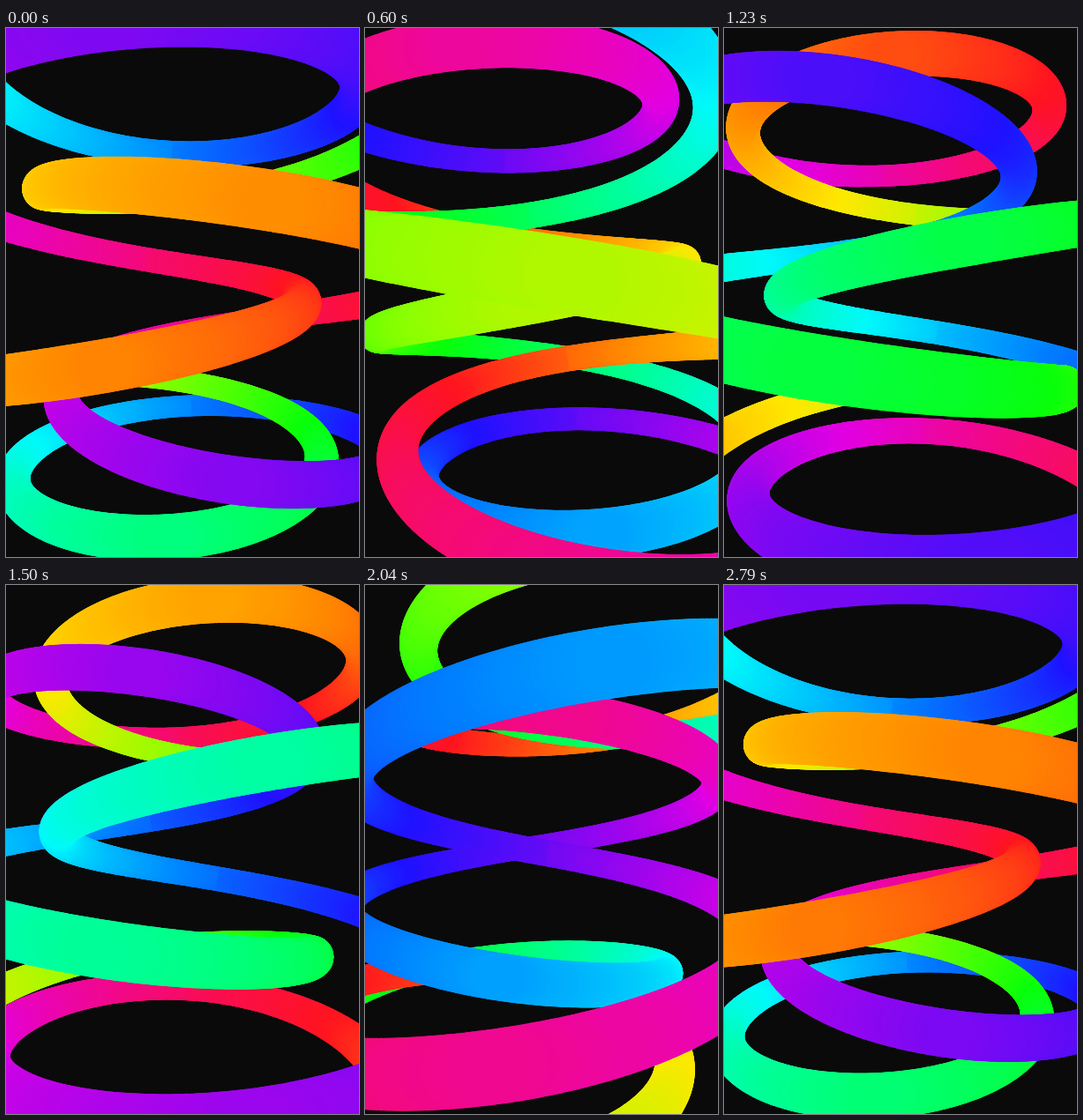
These frames come from a looping animation (400 px wide and 600 px high, 2.82 s). An HTML page with a canvas:

```html
<!DOCTYPE html>
<html>
<head>
<meta charset="utf-8">
<title>Rainbow coil</title>
<style>
html, body { margin: 0; width: 100%; height: 100%; overflow: hidden; background: #0a0a0a; }
canvas { display: block; }
</style>
</head>
<body>
<canvas id="stage" width="400" height="600"></canvas>
<script>
const ctx = document.getElementById('stage').getContext('2d');
const W = 400, H = 600, LOOP = 2820, STEP = 30, TAU = Math.PI * 2;
const CAMERA = 475;      // distance and focal length
const COIL = 200;        // radius of each turn
const SWAY = 71;         // offset of the turns from the axis
const RISE = 208;        // half height of the knot
const TUBE = 18.9;
const TURNS = 6;
const COUNT = 3000;

// one stop every 30 degrees of hue
const STOPS = [
  [255, 20, 32], [255, 138, 0], [255, 232, 0], [140, 255, 0],
  [8, 255, 10], [0, 255, 128], [0, 250, 250], [0, 130, 255],
  [30, 18, 255], [130, 8, 242], [226, 0, 226], [244, 10, 120]
];

const palette = Array.from({ length: 720 }, (_, i) => {
  const p = i / 60, k = Math.floor(p), f = p - k;
  const a = STOPS[k], b = STOPS[(k + 1) % STOPS.length];
  return `rgb(${a.map((v, c) => Math.round(v + (b[c] - v) * f)).join(',')})`;
});

const beads = Array.from({ length: COUNT }, (_, i) => ({ s: i / COUNT * TAU }));

function place(bead, turn) {
  const s = bead.s;
  const coil = TURNS * s + Math.PI + turn;
  const sway = s + Math.PI / 2 + turn;
  const x = COIL * Math.cos(coil) + SWAY * Math.cos(sway);
  const z = COIL * Math.sin(coil) + SWAY * Math.sin(sway);
  const k = CAMERA / (CAMERA - z);
  bead.k = k;
  bead.x = W / 2 + x * k;
  bead.y = H / 2 - RISE * Math.cos(s) * k;
  const hue = (2 * s + Math.PI + turn) / TAU;
  bead.color = palette[Math.floor((hue % 1) * palette.length)];
}

function draw(ms) {
  const turn = ms / LOOP * TAU;
  ctx.fillStyle = '#0a0a0a';
  ctx.fillRect(0, 0, W, H);
  for (const b of beads) place(b, turn);
  const sorted = beads.slice().sort((a, b) => a.k - b.k);
  for (const b of sorted) {
    ctx.fillStyle = b.color;
    ctx.beginPath();
    ctx.arc(b.x, b.y, TUBE * b.k, 0, TAU);
    ctx.fill();
  }
}

const start = performance.now();
function tick() {
  const ms = (performance.now() - start) % LOOP;
  draw(Math.floor(ms / STEP) * STEP);
  requestAnimationFrame(tick);
}
tick();
</script>
</body>
</html>
```
